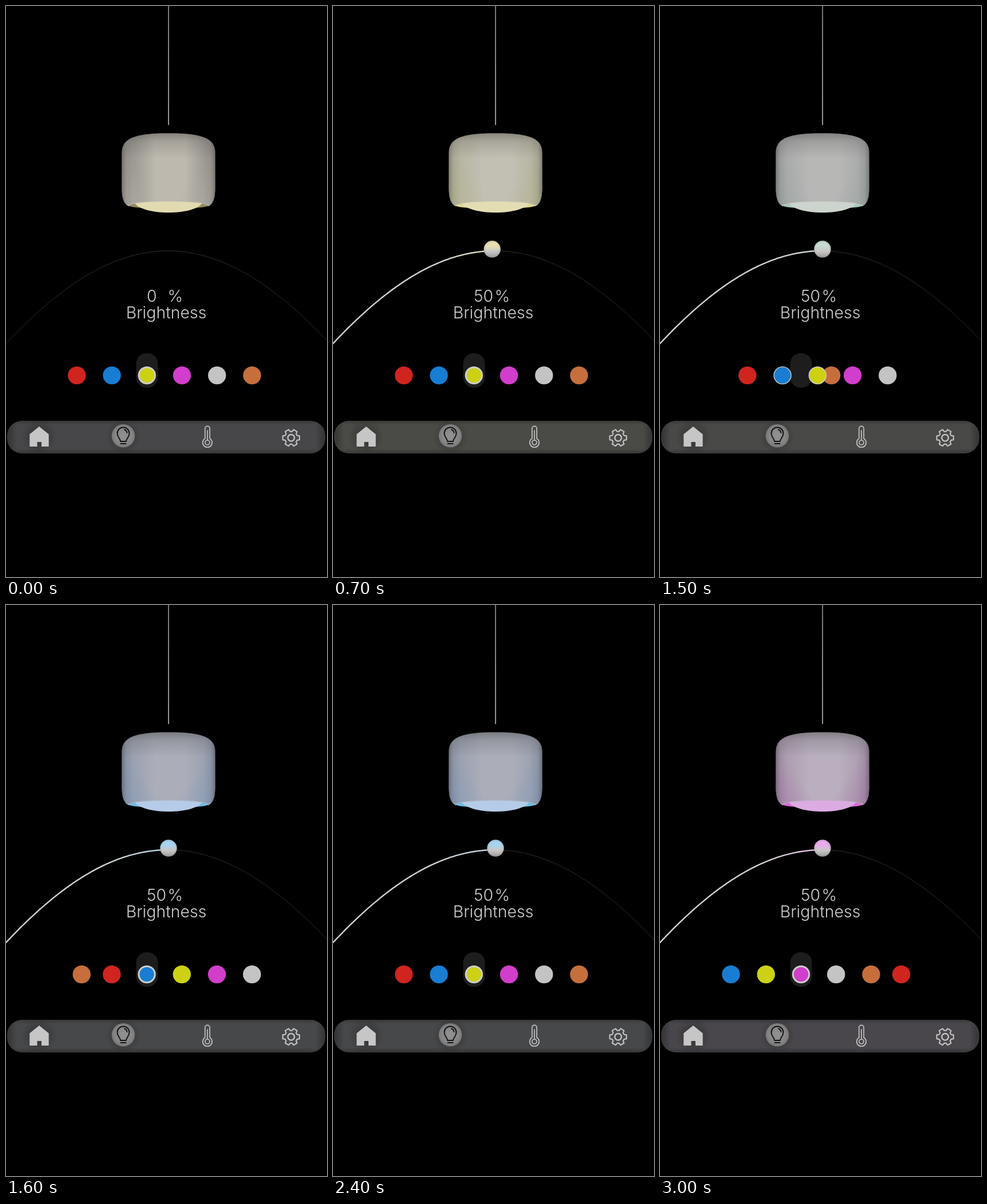
Animation of 561x998 px, one loop 3.1 s. Source, as an HTML page with a canvas:

```html
<!DOCTYPE html>
<html lang="en">
<head>
<meta charset="utf-8">
<title>Lamp control</title>
<style>
  html, body { margin: 0; width: 100%; height: 100%; overflow: hidden; background: #000; }
  canvas { display: block; width: 561px; height: 998px; }
</style>
</head>
<body>
<canvas id="stage" width="561" height="998"></canvas>
<script>
const ctx = document.getElementById('stage').getContext('2d');
const LOOP = 3100, STEP = 100;
const TAU = Math.PI * 2;

const LIGHTS = {
  off:    { mid: [189, 185, 175], edge: [158, 155, 149], low: [174, 171, 163], rim: [146, 139, 96],  bulb: [226, 219, 177], bar: [71, 71, 73], tip: [205, 204, 200] },
  yellow: { mid: [194, 191, 179], edge: [184, 182, 164], low: [184, 182, 148], rim: [224, 217, 150], bulb: [228, 221, 180], bar: [74, 74, 70], tip: [232, 224, 178] },
  blue:   { mid: [171, 174, 185], edge: [156, 162, 177], low: [139, 158, 186], rim: [112, 188, 226], bulb: [181, 203, 231], bar: [71, 72, 74], tip: [168, 211, 240] },
  pink:   { mid: [185, 175, 190], edge: [174, 160, 178], low: [172, 134, 175], rim: [216, 108, 216], bulb: [220, 171, 226], bar: [73, 71, 75], tip: [234, 172, 236] }
};
const DOTS = ['#d0241f', '#187dd3', '#cdd114', '#d13ecb', '#c4c4c4', '#c66f3d'];
const MOVES = [[1400, 0, -1], [2180, -1, 0], [2800, 0, 1]];
const MOVE_TIME = 207, WRAP_TIME = 222;

const clamp = v => Math.max(0, Math.min(1, v));
const ease = v => { v = clamp(v); return v * v * (3 - 2 * v); };
const lerp = (a, b, k) => a + (b - a) * k;
const rgb = (c, a = 1) => `rgba(${c.map(Math.round)},${a})`;

// The slider track is a flat hyperbola.
const TOP_X = 283, TOP_Y = 428, ARC_W = 500, ARC_H = 1087;
const arcY = x => TOP_Y + ARC_H * (Math.hypot(1, (x - TOP_X) / ARC_W) - 1);

function mix(a, b, k) {
  const out = {};
  for (const key in a) out[key] = a[key].map((v, i) => lerp(v, b[key][i], k));
  return out;
}

function linear(x0, y0, x1, y1, stops) {
  const g = ctx.createLinearGradient(x0, y0, x1, y1);
  stops.forEach(([at, color]) => g.addColorStop(at, color));
  return g;
}

function radial(x, y, r, stops) {
  const g = ctx.createRadialGradient(x, y, 0, x, y, r);
  stops.forEach(([at, color]) => g.addColorStop(at, color));
  return g;
}

function disc(x, y, r, fill) {
  ctx.beginPath();
  ctx.arc(x, y, r, 0, TAU);
  ctx.fillStyle = fill;
  ctx.fill();
}

function outline(path, color, width) {
  ctx.strokeStyle = color;
  ctx.lineWidth = width;
  ctx.stroke(new Path2D(path));
}

function lightAt(t, level) {
  let c = mix(LIGHTS.off, LIGHTS.yellow, level);
  c = mix(c, LIGHTS.blue, ease((t - 1400) / 200));
  c = mix(c, LIGHTS.yellow, ease((t - 2400) / 200));
  return mix(c, LIGHTS.pink, ease((t - 2800) / 200));
}

// Walk along the arc from its top for the remaining length.
function knobX(percent) {
  let left = (50 - percent) * 17.6, x = TOP_X + 1;
  while (left > 0) {
    const step = Math.min(1, left);
    x -= step / Math.hypot(1, arcY(x + 0.5) - arcY(x - 0.5));
    left -= step;
  }
  return x;
}

function drawLamp(c) {
  ctx.fillStyle = linear(0, 0, 0, 208, [[0, '#858585'], [0.5, '#9a9a98'], [1, '#a8a7a4']]);
  ctx.fillRect(283.2, 0, 1.8, 208);

  const body = new Path2D('M202.5 256C202.5 230 228 222.5 284 222.5S365.5 230 365.5 256V318C365.5 336 362 345 354 350H214C206 345 202.5 336 202.5 318Z');
  ctx.save();
  ctx.clip(body);
  ctx.fillStyle = linear(202, 0, 366, 0, [[0, rgb(c.edge)], [0.14, rgb(c.edge)], [0.36, rgb(c.mid)], [0.68, rgb(c.mid)], [0.88, rgb(c.edge)], [1, rgb(c.edge)]]);
  ctx.fillRect(200, 220, 168, 134);
  for (const [x0, x1] of [[202, 250], [366, 318]]) {
    ctx.fillStyle = linear(x0, 340, x1, 310, [[0, rgb(c.low, 0.9)], [1, rgb(c.low, 0)]]);
    ctx.fillRect(200, 220, 168, 134);
  }
  ctx.fillStyle = linear(0, 222, 0, 266, [[0, 'rgba(45,43,42,.4)'], [0.35, 'rgba(60,58,56,.18)'], [1, 'rgba(60,58,56,0)']]);
  ctx.fillRect(200, 220, 168, 50);
  ctx.fillStyle = linear(202, 0, 366, 0, [[0, 'rgba(35,34,35,.36)'], [0.05, 'rgba(35,34,35,.1)'], [0.13, 'rgba(35,34,35,0)'], [0.87, 'rgba(35,34,35,0)'], [0.95, 'rgba(35,34,35,.1)'], [1, 'rgba(35,34,35,.36)']]);
  ctx.fillRect(200, 220, 168, 134);
  ctx.restore();

  ctx.fillStyle = rgb(c.rim);
  ctx.fill(new Path2D('M214 348.5C231 339 337 339 354 348.5C350 352 334 353 320 353H248C234 353 218 352 214 348.5Z'));
  ctx.fillStyle = rgb(c.bulb);
  ctx.fill(new Path2D('M225 344.5Q284 337 343 344.5C336 355 312 361 284 361S232 355 225 344.5Z'));
  outline('M214 348C231 338.5 337 338.5 354 348', rgb(c.mid, 0.75), 1.5);
}

function traceArc(from, to) {
  ctx.beginPath();
  ctx.moveTo(from, arcY(from));
  for (let x = from + 3; x < to; x += 3) ctx.lineTo(x, arcY(x));
  ctx.lineTo(to, arcY(to));
}

function drawSlider(x, c, level) {
  traceArc(-6, 567);
  ctx.strokeStyle = linear(0, 0, 561, 0, [[0, '#111'], [0.5, '#1e1e1d'], [1, '#111']]);
  ctx.lineWidth = 1.6;
  ctx.stroke();
  if (x < -20) return;

  traceArc(-6, x);
  ctx.strokeStyle = linear(x - 110, 0, x, 0, [[0, '#d3d3d1'], [1, rgb(c.tip.map(v => lerp(211, v, level * 0.6)))]]);
  ctx.lineWidth = 2.4;
  ctx.stroke();

  const y = arcY(x) - 3;
  const near = ease((x - 60) / 224);
  const top = c.tip.map(v => lerp(203, v, near));
  disc(x, y, 14.7, linear(0, y - 14, 0, y + 14, [[0, rgb(top)], [0.3, rgb(top)], [0.62, '#c9c8c7'], [1, '#a3a2a3']]));
  disc(x, y, 14.7, radial(x, y, 14.7, [[0.75, 'rgba(70,70,70,0)'], [1, 'rgba(70,70,70,.14)']]));
}

function drawText(percent) {
  ctx.fillStyle = '#d0d0ce';
  ctx.font = '300 28.5px Inter, sans-serif';
  ctx.textBaseline = 'alphabetic';
  ctx.textAlign = 'left';
  ctx.fillText(Math.round(percent), 246, 517);
  ctx.fillText('%', 282.5, 517);
  ctx.textAlign = 'center';
  ctx.fillText('Brightness', 280, 546);
}

function drawDots(t) {
  ctx.beginPath();
  ctx.roundRect(227.5, 607, 38, 60, 18);
  ctx.fillStyle = '#1d1d1d';
  ctx.fill();

  const [start, from, to] = MOVES.filter(m => t >= m[0]).pop() || [0, 0, 0];
  const slot = (i, shift) => (i - shift + 6) % 6;
  const dots = DOTS.map((color, i) => {
    const a = slot(i, from), b = slot(i, to);
    const wraps = Math.abs(b - a) > 1;
    const k = ease((t - start) / (wraps ? WRAP_TIME : MOVE_TIME));
    return { color, wraps, x: 123.8 + 61.25 * lerp(a, b, k) };
  });
  dots.sort((a, b) => b.wraps - a.wraps);
  for (const { color, wraps, x } of dots) {
    const picked = wraps ? 0 : clamp(1 - Math.abs(x - 246.3) / 61.25);
    if (picked > 0.02) disc(x, 645.6, 15.7, '#cecdca');
    disc(x, 645.6, 15.7 - 3 * picked, color);
  }
}

function drawGear(x, y) {
  ctx.beginPath();
  for (let i = 0; i < 6; i++) {
    const mid = i * TAU / 6;
    for (const [off, r] of [[-0.37, 11.2], [-0.23, 15], [0.23, 15], [0.37, 11.2]]) {
      ctx.lineTo(x + r * Math.cos(mid + off), y + r * Math.sin(mid + off));
    }
  }
  ctx.closePath();
  ctx.strokeStyle = '#c3c3c3';
  ctx.lineWidth = 2.1;
  ctx.stroke();
  ctx.beginPath();
  ctx.arc(x, y, 5.8, 0, TAU);
  ctx.lineWidth = 2.4;
  ctx.stroke();
}

function drawBar(c) {
  ctx.beginPath();
  ctx.roundRect(2.5, 725.5, 555, 56, 25);
  ctx.fillStyle = rgb(c.bar);
  ctx.fill();
  ctx.save();
  ctx.clip();
  ctx.fillStyle = linear(0, 725, 0, 782, [[0, 'rgba(0,0,0,.22)'], [0.12, 'rgba(0,0,0,0)'], [0.85, 'rgba(0,0,0,0)'], [1, 'rgba(0,0,0,.25)']]);
  ctx.fillRect(0, 724, 561, 60);
  ctx.fillStyle = linear(2, 0, 558, 0, [[0, 'rgba(0,0,0,.3)'], [0.03, 'rgba(0,0,0,0)'], [0.97, 'rgba(0,0,0,0)'], [1, 'rgba(0,0,0,.3)']]);
  ctx.fillRect(0, 724, 561, 60);
  for (const x of [58, 205]) {
    disc(x, 753, 31, radial(x, 753, 31, [[0.45, 'rgba(20,20,20,.25)'], [1, 'rgba(20,20,20,0)']]));
  }
  ctx.restore();
  ctx.beginPath();
  ctx.roundRect(2.5, 725.5, 555, 56, 25);
  ctx.strokeStyle = 'rgba(105,105,105,.4)';
  ctx.lineWidth = 1;
  ctx.stroke();

  ctx.lineJoin = ctx.lineCap = 'round';
  ctx.fillStyle = '#c6c6c6';
  ctx.fill(new Path2D('M58 735L74.7 748.5V770H62V762H54.5V770H41.3V748.5Z'));

  disc(205, 751.3, 20.3, radial(205, 751, 20.3, [[0, '#929292'], [0.75, '#858585'], [1, '#777']]));
  outline('M200 761C200 756 194.5 754 194.5 747A10.5 10.5 0 0 1 215.5 747C215.5 754 210 756 210 761Z', '#131313', 2);
  outline('M200.5 765H209.5M207 740.5Q211 742 211.5 746', '#131313', 1.9);

  outline('M347.8 756V738.5A4.2 4.2 0 0 1 356.2 738.5V756A8.2 8.2 0 1 1 347.8 756Z', '#c3c3c3', 1.7);
  outline('M352 742V758.5M356 763A4 4 0 1 1 348 763A4 4 0 1 1 356 763', '#c3c3c3', 1.7);
  drawGear(498.3, 754.8);
}

function draw(t) {
  const percent = 50 * ease(t / 735);
  const level = percent / 50;
  const c = lightAt(t, level);
  ctx.fillStyle = '#000';
  ctx.fillRect(0, 0, 561, 998);
  drawLamp(c);
  drawSlider(knobX(percent), c, level);
  drawText(percent);
  drawDots(t);
  drawBar(c);
}

const begin = performance.now();
function frame() {
  const t = (performance.now() - begin) % LOOP;
  draw(Math.floor(t / STEP) * STEP);
  requestAnimationFrame(frame);
}
frame();
</script>
</body>
</html>
```
